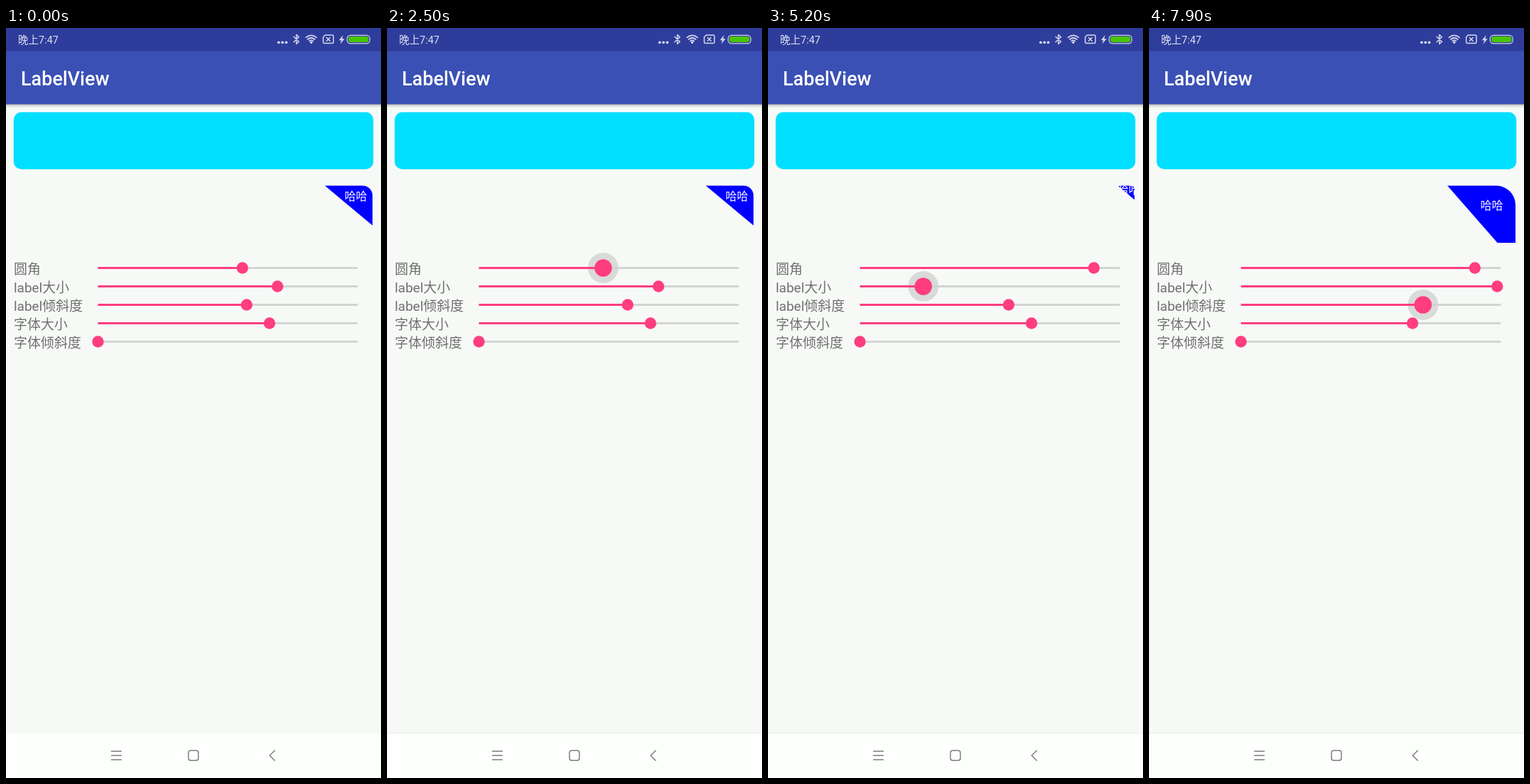
An HTML page for the animation above (8000 ms loop, 529 by 1058 pixels).

```html
<!DOCTYPE html>
<html lang="zh">
<head>
<meta charset="utf-8">
<title>LabelView</title>
<style>
html, body { margin: 0; width: 100%; height: 100%; overflow: hidden; background: #f7f9f7; }
svg { display: block; width: 529px; height: 1058px; }
text { font-family: Roboto, "Noto Sans CJK SC", "Noto Sans CJK", sans-serif; }
.icon { fill: none; stroke: #d5d8ec; stroke-width: 1.5; stroke-linecap: round; stroke-linejoin: round; }
.nav { fill: none; stroke: #7c7d7c; stroke-width: 1.5; stroke-linecap: round; stroke-linejoin: round; }
</style>
</head>
<body>
<svg viewBox="0 0 529 1058">
  <defs>
    <linearGradient id="shade" x1="0" y1="0" x2="0" y2="1">
      <stop offset="0" stop-color="#000" stop-opacity=".36"/>
      <stop offset=".4" stop-color="#000" stop-opacity=".12"/>
      <stop offset="1" stop-color="#000" stop-opacity="0"/>
    </linearGradient>
    <clipPath id="view"><rect x="11" y="222.3" width="506" height="80.7"/></clipPath>
  </defs>

  <rect width="529" height="1058" fill="#f7f9f7"/>
  <rect y="107" width="529" height="6" fill="url(#shade)"/>
  <rect width="529" height="107.5" fill="#3b50b4"/>
  <rect width="529" height="32.5" fill="#2e3d9b"/>
  <text x="17" y="21.8" font-size="14.5" fill="#dfe2f2">晚上7:47</text>
  <text x="21" y="81" font-size="27" font-weight="500" fill="#fff">LabelView</text>

  <g fill="#d5d8ec">
    <circle cx="384.7" cy="20.3" r="1.9"/>
    <circle cx="390" cy="20.3" r="1.9"/>
    <circle cx="395.3" cy="20.3" r="1.9"/>
    <path d="M475.5 10L469.7 17.3H473L471.6 22.6L477.6 15.2H474.2Z"/>
    <circle cx="430.6" cy="20.4" r="1.7"/>
  </g>
  <g class="icon">
    <path d="M405.8 12.3L413.2 19.2L409.6 22.5V9.5L413.2 12.8L405.8 19.7"/>
    <path d="M423.2 13.4Q430.6 7.2 438 13.4M425.6 16Q430.6 12 435.6 16M428 18.4Q430.6 16.4 433.2 18.4" stroke-width="1.7"/>
    <path d="M450.2 10H460.3Q461.8 10 461.8 11.5V20Q461.8 21.5 460.3 21.5H449Q447.5 21.5 447.5 20V12.7Z"/>
    <path d="M452.3 13.5L457 18.2M457 13.5L452.3 18.2"/>
    <rect x="481.2" y="10.3" width="32" height="11.6" rx="4.6" stroke-width="1.2"/>
  </g>
  <rect x="483" y="12.1" width="28.4" height="8" rx="3" fill="#49c500"/>

  <rect x="10.8" y="118.8" width="507.4" height="80.4" rx="10.5" fill="#00dfff"/>
  <g clip-path="url(#view)">
    <path id="label" fill="#00f"/>
    <text id="word" font-size="16" fill="#fff" text-anchor="middle">哈哈</text>
  </g>
  <g id="rows"></g>

  <rect y="995" width="529" height="63" fill="#fdfffd"/>
  <rect id="rule" y="994.4" width="529" height="1" fill="#e9ebe9"/>
  <g class="nav">
    <path d="M148.8 1020.3H162.6M148.8 1026.3H162.6M148.8 1032.3H162.6"/>
    <rect x="257.4" y="1019.2" width="14" height="14" rx="3.2"/>
    <path d="M379 1019.3L372 1026.3L379 1033.3"/>
  </g>
</svg>
<script>
const NS = "http://www.w3.org/2000/svg";
const $ = id => document.getElementById(id);
const LOOP = 8000, STEP = 100;
const X0 = 129.7, SPAN = 366.6;
const RIGHT = 517, TOP = 222.3, VIEW_H = 80.7;

// keys: [time, thumb x]; press: [down, up]
const sliders = [
  { name: "圆角", press: [200, 3700],
    keys: [[200, 333.5], [800, 129.7], [1100, 129.7], [1600, 394.7], [2000, 190.5], [2100, 190.5],
           [2500, 305], [2700, 365], [3000, 235.5], [3700, 459.7]] },
  { name: "label大小", press: [4200, 6000],
    keys: [[4200, 383], [4600, 206.6], [4800, 129.7], [5000, 129.7], [5800, 487.2], [5900, 491.2]] },
  { name: "label倾斜度", press: [6700, LOOP + 500],
    keys: [[6700, 339.5], [7200, 209.5], [7300, 213.5], [7500, 271.5], [7900, 386.5]] },
  { name: "字体大小", keys: [[0, 371.7]] },
  { name: "字体倾斜度", keys: [[0, 129.7]] }
];

function add(parent, tag, attrs) {
  const el = document.createElementNS(NS, tag);
  set(el, attrs);
  return parent.appendChild(el);
}
function set(el, attrs) {
  for (const k in attrs) el.setAttribute(k, attrs[k]);
}
function at(keys, t) {
  if (t <= keys[0][0]) return keys[0][1];
  for (let i = 1; i < keys.length; i++) {
    const [t0, a] = keys[i - 1], [t1, b] = keys[i];
    if (t <= t1) return a + (b - a) * (t - t0) / (t1 - t0);
  }
  return keys[keys.length - 1][1];
}
const unit = v => Math.max(0, Math.min(1, v));

sliders.forEach((s, i) => {
  const y = 338.5 + 26 * i, g = $("rows");
  add(g, "text", { x: 11, y: y + 8.6, "font-size": 19, fill: "#6f716f" }).textContent = s.name;
  s.halo = add(g, "circle", { cy: y, r: 21.5, fill: "#000" });
  add(g, "rect", { x: X0, y: y - 1.4, width: SPAN, height: 2.8, fill: "#d1d3d1" });
  s.bar = add(g, "rect", { x: X0, y: y - 1.5, height: 3, fill: "#ff3d7f" });
  s.thumb = add(g, "circle", { cy: y, fill: "#ff3d7f" });
});

function drawLabel([corner, size, tilt]) {
  const w = 97.6 * size;
  const h = w * Math.tan(tilt * 69.6 * Math.PI / 180);
  const r = Math.min(40 * corner, h / 4, w / 2);
  set($("label"), {
    d: `M${RIGHT - w} ${TOP}H${RIGHT - r}A${r} ${r} 0 0 1 ${RIGHT} ${TOP + r}V${TOP + h}Z`
  });
  set($("word"), {
    x: RIGHT - 0.23 * w - 0.14 * Math.min(h, VIEW_H),
    y: TOP + h / 4 + 6.3
  });
}

function draw(t) {
  const values = sliders.map(s => {
    const x = at(s.keys, t);
    const [down, up] = s.press || [LOOP * 2, LOOP * 3];
    const held = Math.min(unit((t - down + 100) / 200), unit((up + 200 - t) / 200));
    set(s.halo, { cx: x, "fill-opacity": 0.12 * held });
    set(s.bar, { width: x - X0 });
    set(s.thumb, { cx: x, r: 8.2 + 4.1 * held });
    return (x - X0) / SPAN;
  });
  drawLabel(values);
  $("rule").style.opacity = t ? 1 : 0;
}

const start = performance.now();
function tick() {
  const t = Math.max(0, performance.now() - start) % LOOP;
  draw(Math.floor(t / STEP) * STEP);
  requestAnimationFrame(tick);
}
tick();
</script>
</body>
</html>
```
